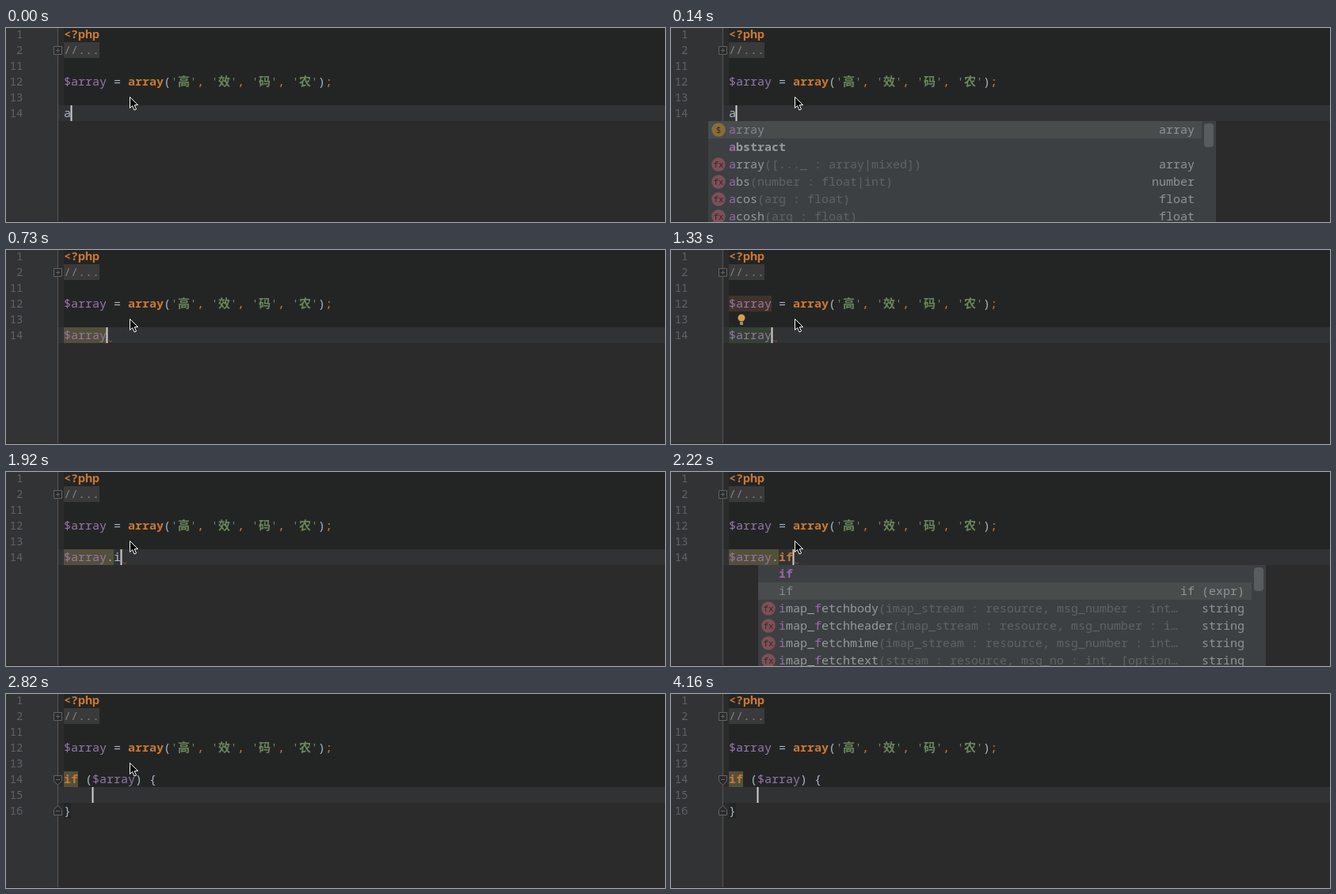
Animation, 832 px wide and 246 px high, one loop 4590 ms. Source, as an HTML page with a canvas:

```html
<!DOCTYPE html>
<html lang="en">
<head>
<meta charset="utf-8">
<title>Postfix completion</title>
<style>
  html, body { margin: 0; width: 100%; height: 100%; overflow: hidden; background: #2b2b2b; }
  canvas { display: block; }
</style>
</head>
<body>
<canvas width="832" height="246"></canvas>
<script>
const ctx = document.querySelector('canvas').getContext('2d');
const LOOP = 4590, CHAR = 9, LEFT = 73;
const PLAIN = '#a9b7c6', VARIABLE = '#9876aa', KEYWORD = '#cc7832', STRING = '#6a8759';
const OLIVE = '#52503a', PHP_BG = '#232525', CARET_ROW = '#313233', GUTTER = '#606366';

const rowTop = row => row * 20 - 2;

function box(x, y, w, h, color) {
  ctx.fillStyle = color;
  ctx.fillRect(x, y, w, h);
}

function shape(points, fill, stroke, close = true) {
  ctx.beginPath();
  points.forEach(([x, y]) => ctx.lineTo(x, y));
  if (close) ctx.closePath();
  if (fill) { ctx.fillStyle = fill; ctx.fill(); }
  ctx.strokeStyle = stroke;
  ctx.lineWidth = 1;
  ctx.stroke();
}

function font(size, weight = 400) {
  ctx.font = `${weight} ${size}px "Noto Sans Mono", "Noto Sans CJK SC", "Noto Sans CJK", monospace`;
}

// Each part is [text, color, weight]; Han characters take 15 px, all others 9 px.
function write(x, baseline, ...parts) {
  for (const [text, color, weight] of parts) {
    font(15, weight);
    ctx.fillStyle = color;
    for (const c of text) {
      ctx.fillText(c, x, baseline);
      x += c > '\u2fff' ? 15 : CHAR;
    }
  }
}

const code = (row, ...parts) => write(LEFT, rowTop(row) + 15, ...parts);
const highlight = (row, chars, color) => box(LEFT, rowTop(row), chars * CHAR, 20, color);

const fx = (name, tail, type) => ({ icon: 'fx', name, tail, type });
const word = name => ({ name, type: '', weight: 700 });
const postfix = (name, type) => ({ name, type, unmatched: true });
const arrayVar = { icon: '$', name: 'array', type: 'array' };
const arrayFn = fx('array', '([..._ : array|mixed])', 'array');
const arrayFns = [
  fx('array_change_key_case', '(input : array, [case : int|null = …', 'array'),
  fx('array_chunk', '(input : array, size : int, [preserve_keys : …', 'array'),
  fx('array_column', '(array : array, column, [index_key : mixed|n…', 'array')];

const popups = {
  a: { x: 47, selected: 0, items: [
    arrayVar, word('abstract'), arrayFn,
    fx('abs', '(number : float|int)', 'number'),
    fx('acos', '(arg : float)', 'float'),
    fx('acosh', '(arg : float)', 'float')] },
  ar: { x: 47, selected: 0, items: [arrayVar, word('array'), arrayFn, ...arrayFns] },
  arr: { x: 47, selected: 0, items: [
    arrayVar, arrayFn, ...arrayFns,
    fx('array_combine', '(keys : array, values : array)', 'array')] },
  i: { x: 110, selected: 1, items: [
    word('if'), postfix('if', 'if (expr)'), postfix('isset', 'isset(expr)'),
    fx('idate', '(format : string, [timestamp : int|null…', 'int'),
    fx('implode', '(glue : string, pieces : array)', 'string'),
    fx('in_array', '(needle, haystack : array, [strict : b…', 'bool')] },
  if: { x: 110, selected: 1, items: [
    word('if'), postfix('if', 'if (expr)'),
    fx('imap_fetchbody', '(imap_stream : resource, msg_number : int…', 'string'),
    fx('imap_fetchheader', '(imap_stream : resource, msg_number : i…', 'string'),
    fx('imap_fetchmime', '(imap_stream : resource, msg_number : int…', 'string'),
    fx('imap_fetchtext', '(stream : resource, msg_no : int, [option…', 'string')] }
};

// Colours the letters of the query in the order they occur in the name.
function matched(name, query, color, weight) {
  let hits = 0;
  return [...name].map(c => {
    const hit = c === query[hits];
    if (hit) hits++;
    return [c, hit ? '#9b69a8' : color, weight];
  });
}

function drawIcon(kind, x, y) {
  ctx.beginPath();
  ctx.arc(x, y, 8.7, 0, 7);
  ctx.fillStyle = kind === '$' ? '#8a6c38' : '#7f4f57';
  ctx.fill();
  font(11);
  ctx.fillStyle = '#2f2a2b';
  ctx.textAlign = 'center';
  ctx.fillText(kind, x, y + 4);
  ctx.textAlign = 'left';
}

function drawPopup(query) {
  const { x, selected, items } = popups[query];
  box(x, 118, 641, 128, '#3c4042');
  box(x, 118 + selected * 22, 623, 22, '#484c4d');
  items.forEach(({ icon, name, tail = '', type, weight, unmatched }, i) => {
    const top = 118 + i * 22;
    if (icon) drawIcon(icon, x + 13, top + 11);
    write(x + 26, top + 16,
      ...matched(name, unmatched ? '' : query, i === selected ? '#868a8c' : '#959a9c', weight),
      [tail, '#5f6365']);
    write(x + 614 - type.length * CHAR, top + 16, [type, '#8f9496']);
  });
  ctx.beginPath();
  ctx.roundRect(x + 626, 121, 12, 30, 4);
  ctx.fillStyle = '#585c5d';
  ctx.fill();
}

// point: 0 = square, 1 = tip below, -1 = tip above
function foldMark(row, point) {
  const y = rowTop(row) + 10.5;
  const side = 5 - 3 * Math.abs(point), dir = point || 1;
  shape([[60.5, y - 5 * dir], [60.5, y + side * dir], [65.5, y + (point ? 7 : 5) * dir],
    [70.5, y + side * dir], [70.5, y - 5 * dir]], '#2b2b2b', GUTTER);
  box(63, y - 0.5, 5, 1, GUTTER);
  if (!point) box(65, y - 2.5, 1, 5, GUTTER);
}

function drawPage(t) {
  const expanded = t >= 2520, settled = t >= 2820;
  const caretRow = settled ? 6 : 5;
  box(0, 0, 832, 246, '#2b2b2b');
  box(LEFT, 0, 759, rowTop(caretRow), PHP_BG);
  if (expanded && !settled) box(LEFT, 118, 759, 20, PHP_BG);
  box(66, rowTop(caretRow), 766, 20, CARET_ROW);
  if (expanded) highlight(7, 1, PHP_BG);
  box(0, 0, 65, 246, '#313335');
  box(65, 0, 1, 246, '#555759');
  box(0, 245, 832, 1, '#2f2829');

  font(14);
  ctx.fillStyle = GUTTER;
  ctx.textAlign = 'right';
  [1, 2, 11, 12, 13, 14, 15, 16].slice(0, expanded ? 8 : 6)
    .forEach((n, row) => ctx.fillText(n, 21.5, rowTop(row) + 15));
  ctx.textAlign = 'left';

  foldMark(1, 0);
  code(0, ['<?php', KEYWORD, 700]);
  highlight(1, 5, '#3a3a3a');
  code(1, ['//...', '#808080']);

  if (t >= 880 && t < 1920) highlight(3, 6, '#40332b');
  const items = [...'高效码农'].flatMap((c, i) =>
    [[i ? ', ' : '', KEYWORD], ["'", STRING], [c, STRING, 700], ["'", STRING]]);
  code(3, ['$array', VARIABLE], [' = ', PLAIN], ['array', KEYWORD, 700], ['(', PLAIN],
    ...items, [')', PLAIN], [';', KEYWORD]);
}

function drawBulb() {
  ctx.beginPath();
  ctx.arc(89, 86, 4.5, 0, 7);
  ctx.fillStyle = '#d9a343';
  ctx.fill();
  box(87, 91, 4, 4, '#8c8f91');
}

function drawCaret(row, column) {
  box(LEFT + column * CHAR - 0.5, rowTop(row), 2, 20, '#d0d0d0');
}

function drawTyping(t) {
  if (t < 730) {
    const typed = t < 290 ? 'a' : t < 440 ? 'ar' : 'arr';
    code(5, [typed, PLAIN]);
    drawCaret(5, typed.length);
    if (t >= 140) drawPopup(typed);
    return;
  }
  const suffix = t < 1630 ? '' : t < 1920 ? '.' : t < 2220 ? '.i' : '.if';
  const marked = t >= 880 && t < 1920;
  highlight(5, t < 1920 ? 6 : 7, marked ? '#344134' : OLIVE);
  code(5, ['$array', VARIABLE], [suffix[0] || '', PLAIN],
    suffix === '.if' ? ['if', KEYWORD, 700] : [suffix.slice(1), PLAIN]);
  const column = 6 + suffix.length, x = LEFT + column * CHAR;
  drawCaret(5, column);
  shape([[x + 1.5, 116], [x + 3, 114.5], [x + 5, 116.5], [x + 7, 115]], null, '#9c4a4c', false);
  if (t >= 1330 && t < 1630) drawBulb();
  if (t >= 2070) drawPopup(suffix.slice(1));
}

function drawExpanded(t) {
  const settled = t >= 2820;
  if (settled) {
    highlight(5, 2, OLIVE);
    foldMark(5, 1);
    foldMark(7, -1);
  }
  code(5, ['if', KEYWORD, 700], [' (', PLAIN], ['$array', VARIABLE], [') {', PLAIN]);
  code(7, ['}', PLAIN]);
  if (!settled) drawCaret(5, 13);
  else if (t < 3720 || t >= 4160) drawCaret(6, 4);
}

function drawPointer(t) {
  if (t >= 4160) return;
  const [x, y] = t < 3860 ? [156, 87] : t < 4010 ? [294, 143] : [600, 203];
  const arrow = [[0, 0], [0, 14], [3, 11], [5.5, 16.5], [8, 15.5], [5.7, 10.3], [10, 10]];
  shape(arrow.map(([dx, dy]) => [x + dx + 0.5, y + dy + 0.5]), '#000', '#fff');
}

function frame() {
  const t = performance.now() % LOOP;
  drawPage(t);
  (t < 2520 ? drawTyping : drawExpanded)(t);
  drawPointer(t);
  requestAnimationFrame(frame);
}
frame();
</script>
</body>
</html>
```
